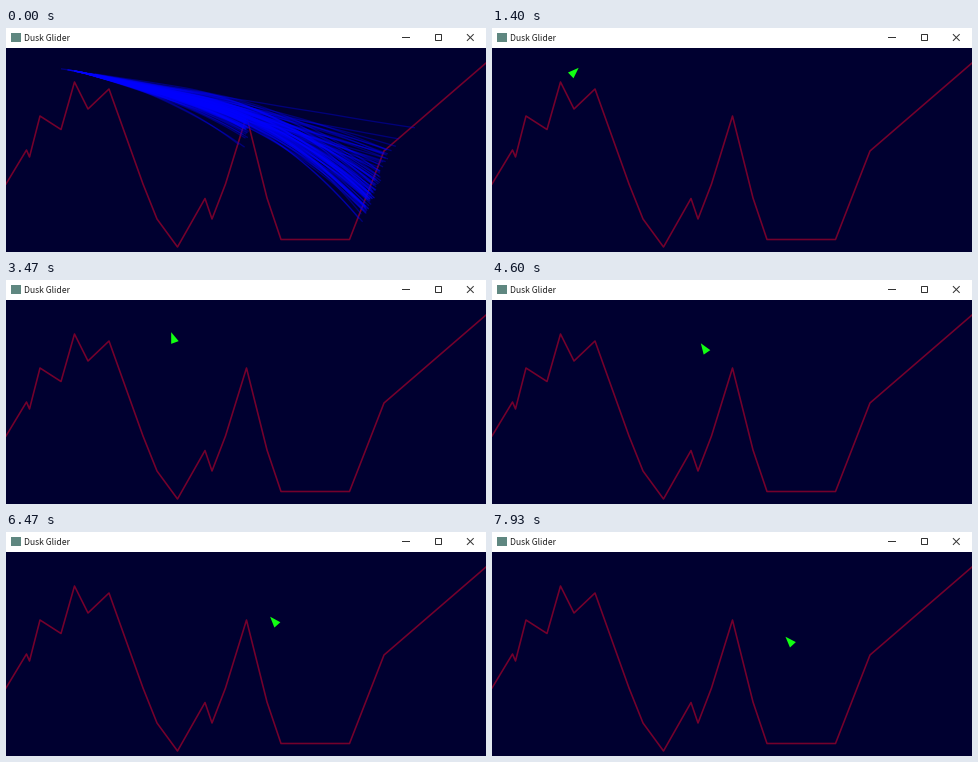
Animation, 480 px wide and 224 px high, one loop 8 s. Source, as a matplotlib script:

```python
import numpy as np
import matplotlib.pyplot as plt
from matplotlib.animation import FuncAnimation
from matplotlib.collections import LineCollection
from matplotlib.patches import Polygon, Rectangle

W, H, DPI = 480, 224, 100
FRAMES, STEP_MS = 160, 50
GENS, GEN_S = 5, 1 / 15
LAUNCH = GENS * GEN_S
START, SPEED = (34.3, 39), 6.86
PX = 72 / DPI  # points per pixel

fig = plt.figure(figsize=(W / DPI, H / DPI), dpi=DPI, facecolor="#000030")
ax = fig.add_axes([0, 0, 1, 1])
ax.set(xlim=(0, W), ylim=(H, 0))
ax.axis("off")

GROUND = np.array([
    (0, 156), (20.5, 122), (23.5, 129), (34, 88), (55, 101.5), (68.5, 54),
    (82, 81), (103, 61), (137, 156), (151, 191), (171.5, 219), (199, 170.5),
    (206, 191), (219.5, 156), (240.5, 88), (261, 170), (275, 211.5),
    (343.5, 211.5), (378, 123), (480, 35)])


def flights(gen, count=150, turns=75):
    """Paths of one generation, each cut where it meets the ground."""
    rng = np.random.default_rng(40 + gen)
    mix = gen / (GENS - 1)

    def spread(first, last, sd):
        return rng.normal(first + (last - first) * mix, sd, (count, 1))

    kind = rng.random((count, 1))
    low = kind < 0.05 + 0.05 * mix
    high = kind > 0.85 - 0.1 * mix

    # Free fall, then a glide, then the braking descent
    glide_at = spread(7.5, 7.5, 0.8)
    drop_at = spread(23, 24, 1.5)
    glide_x = spread(-0.01, -0.02, 0.01)
    glide_y = np.where(low, spread(0.13, 0.13, 0.03),
                       spread(0.01, 0, 0.016))
    glide_y = np.where(high, spread(-0.005, -0.01, 0.012), glide_y)
    drop_x = np.where(high, spread(-0.02, -0.02, 0.015),
                      spread(-0.03, -0.14, 0.015 + 0.05 * mix))
    drop_y = np.where(high, spread(0.02, -0.005, 0.018),
                      spread(0.13, 0.14, 0.02 + 0.03 * mix))

    turn = np.arange(turns)
    fall, glide = turn < glide_at, turn < drop_at
    acc_x = np.where(fall, 0, np.where(glide, glide_x, drop_x))
    acc_y = np.where(fall, 0.2, np.where(glide, glide_y, drop_y))
    acc_x = acc_x + rng.normal(0, 0.03, acc_x.shape)
    acc_y = acc_y + rng.normal(0, 0.03, acc_y.shape) * (turn > 4)
    x = START[0] + np.cumsum(SPEED + np.cumsum(acc_x, axis=1), axis=1) - SPEED
    y = START[1] + np.cumsum(np.cumsum(acc_y, axis=1), axis=1) - 0.2

    # Few paths show their first turns, so the trail fades in
    begin = (9 * rng.random(count) ** 0.2).astype(int)
    paths = []
    for px, py, b in zip(x, y, begin):
        hit = py > np.interp(px, GROUND[:, 0], GROUND[:, 1])
        end = np.argmax(hit) + 1 if hit.any() else turns
        paths.append(np.column_stack([px[b:end], py[b:end]]))
    return paths


generations = [flights(g) for g in range(GENS)]
SHAPE = np.array([(0, -5.8), (4, 5.2), (-4, 5.2)])


def lander(t):
    u = t - LAUNCH
    x = 37.4 + 41.3 * u - 3 * max(t - 3.7, 0) ** 2
    y = START[1] + 3.6 * u + 0.74 * u ** 2
    a = np.radians(-43 + 133 * np.exp(-(max(u, 0) / 2.1) ** 1.4))
    turn = np.array([(np.cos(a), np.sin(a)), (-np.sin(a), np.cos(a))])
    return SHAPE @ turn + (x, y)


swarm = LineCollection([], colors=[(0, 0, 1, 0.36)], linewidths=1.3 * PX,
                       zorder=2)
ax.add_collection(swarm, autolim=False)
ax.plot(*GROUND.T, color="#b4002a", alpha=0.65, lw=1.6 * PX, zorder=1)
ship = Polygon(SHAPE, closed=True, fc="#12ff12", ec="none", zorder=4)
ax.add_patch(ship)

# Window title bar
ax.add_patch(Rectangle((0, 0), W, 20, fc="white", ec="none", zorder=5))
ax.add_patch(Rectangle((4.5, 5), 10, 9, fc="#5f8780", ec="none", zorder=6))
ax.text(18, 12.6, "Dusk Glider", family="Noto Sans CJK JP",
        size=8.6 * PX, color="#222222", va="baseline", zorder=6)
pen = dict(color="#333333", lw=PX, zorder=6)
ax.plot([396, 403], [9.5, 9.5], **pen)
ax.add_patch(Rectangle((428.5, 6.5), 6, 6, fc="none", ec="#333333",
                       lw=PX, zorder=6))
for ends in ([6.5, 12.5], [12.5, 6.5]):
    ax.plot([461.3, 467.3], ends, **pen)


def update(i):
    t = (i + 0.5) * STEP_MS / 1000
    flying = t >= LAUNCH
    swarm.set_visible(not flying)
    ship.set_visible(flying)
    if flying:
        ship.set_xy(lander(t))
    else:
        swarm.set_segments(generations[int(t / GEN_S)])
    return swarm, ship


anim = FuncAnimation(fig, update, frames=FRAMES, interval=STEP_MS,
                     init_func=lambda: update(0), repeat=True, repeat_delay=0)
plt.show()
```
